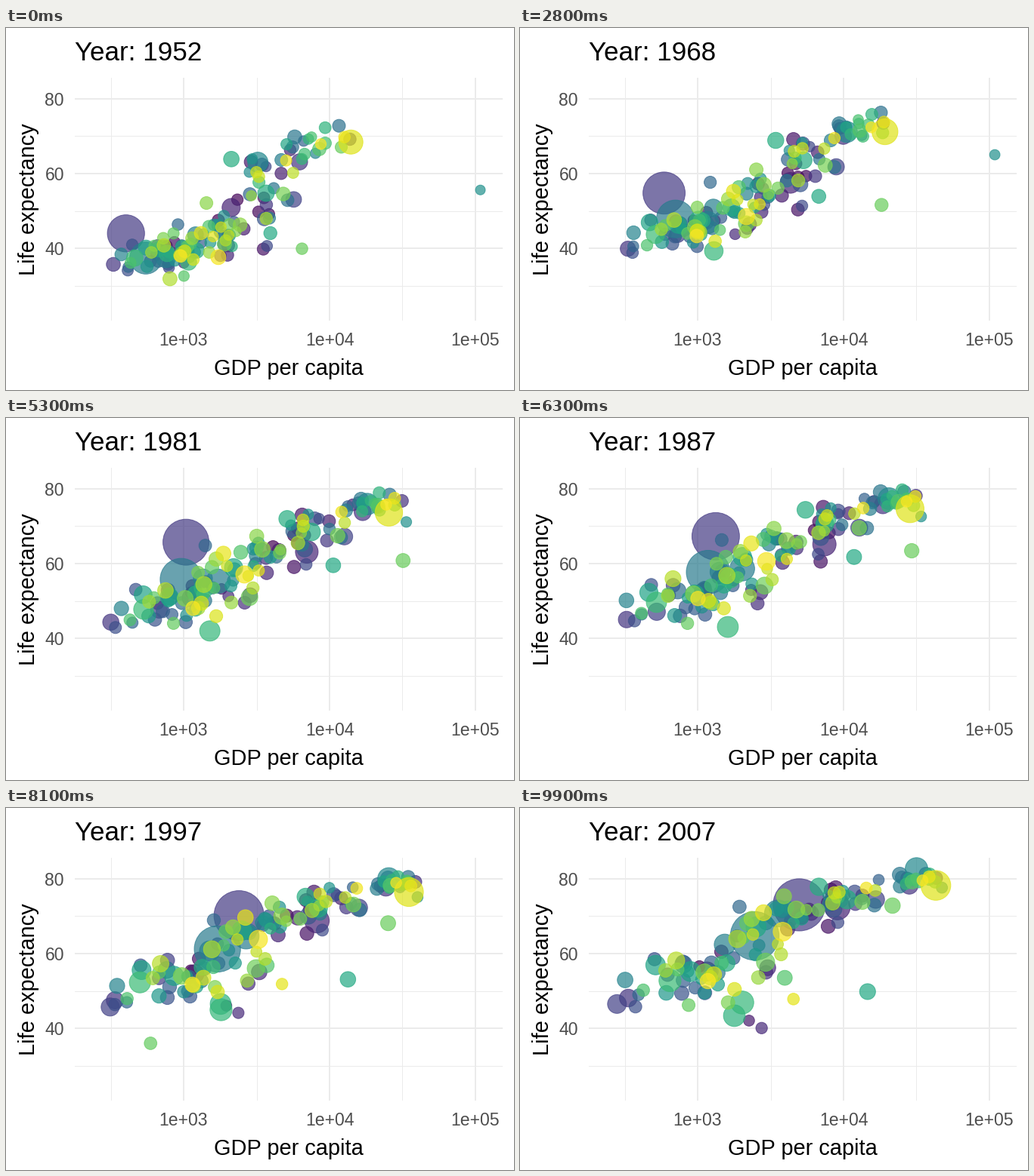
A matplotlib script that plays this animation: 672 by 480 pixels, repeating every 10 s.

```python
import matplotlib.pyplot as plt
import numpy as np
from matplotlib.animation import FuncAnimation

W, H, DPI = 672, 480, 96
FRAMES, COUNT, STEP = 100, 142, 9    # a survey every STEP frames
YEARS = np.arange(0, 56, 5)          # years after 1952
P = YEARS / 55
EASE = 1 - (1 - P) ** 1.5            # early gains are the fastest
FALL = np.clip((YEARS - 35) / 15, 0, 1)

rng = np.random.default_rng(11)
gdp, life, pop = np.zeros((3, len(YEARS), COUNT))   # log10, years, millions


def bubble(i, people, *points):
    """One bubble led through a few (year, wealth, age) points."""
    t, wealth, age = zip(*points)
    gdp[:, i] = np.interp(YEARS, t, np.log10(wealth))
    life[:, i] = np.interp(YEARS, t, age)
    pop[:, i] = np.interp(YEARS, (0, 55), people)


def track(ends, spreads, z, ease):
    start, end = np.array(ends) + np.array(spreads) * z
    return start + (end - start) * ease


def crowd(slots, wealth, wealth_sd, age, age_sd, growth, fall=0):
    """Seeded bubbles that drift from a start cloud to an end cloud."""
    for i in slots:
        zw, za, zp = np.clip(rng.normal(size=3), -2, 2)
        za = .5 * zw + .85 * za
        wobble = rng.normal(size=(2, len(YEARS)))
        gdp[:, i] = track(wealth, wealth_sd, zw, EASE) + .03 * wobble[0]
        life[:, i] = track(age, age_sd, za, EASE) + .5 * wobble[1]
        life[:, i] -= fall * FALL
        pop[:, i] = np.exp(1.6 + zp) * (1 + (growth - 1) * P)


bubble(24, (556, 1319), (0, 400, 44), (10, 488, 44.5), (20, 677, 63),
       (40, 1656, 68.7), (55, 4959, 73))
bubble(58, (372, 1110), (0, 547, 37.4), (25, 813, 54.2), (55, 2452, 64.7))
bubble(134, (158, 301), (0, 13990, 68.4), (55, 42952, 78.2))
bubble(59, (82, 224), (0, 750, 37.5), (55, 3541, 70.7))
bubble(66, (86, 127), (0, 3217, 63), (20, 14779, 73.4), (55, 31656, 82.6))
bubble(14, (57, 190), (0, 2109, 50.9), (25, 6660, 61.5), (55, 9066, 72.4))
bubble(94, (33, 135), (0, 1077, 36.3), (55, 2014, 46.9))
bubble(71, (.2, 2.5), (0, 108382, 55.6), (20, 109348, 67.7),
       (30, 31354, 71.3), (55, 47307, 77.6))
bubble(109, (4, 28), (0, 6460, 39.9), (25, 34168, 58.7), (55, 21655, 72.8))
bubble(107, (3, 9), (35, 848, 44), (40, 737, 23.6), (45, 590, 36),
       (55, 863, 46.2))
bubble(27, (14, 65), (0, 781, 39.1), (30, 674, 47.8), (50, 241, 45),
       (55, 278, 46.5))

free = rng.permutation(np.flatnonzero(pop[0] == 0))
poor, middle, upper, rich, falling = np.split(free, (48, 81, 105, 124))
crowd(poor, (2.93, 3.03), (.2, .27), (38.5, 54), (3, 5), 3.2)
crowd(middle, (3.3, 3.65), (.2, .22), (45, 71), (5, 3), 2.8)
crowd(upper, (3.55, 4.05), (.17, .15), (58, 75.5), (5, 1.7), 1.7)
crowd(rich, (3.88, 4.5), (.14, .07), (67.5, 79.8), (2.2, .8), 1.4)
crowd(falling, (3.1, 3.55), (.3, .38), (42, 64), (3, 4), 3, fall=18)

diameter = 12.3 + 56.9 * np.sqrt(np.clip(pop / 1318.7, 0, 1))   # pixels

plt.rcParams["font.family"] = ["Liberation Sans", "DejaVu Sans"]
fig = plt.figure(figsize=(W / DPI, H / DPI), dpi=DPI, facecolor="white")
ax = fig.add_axes((91 / W, 1 - 388 / H, 566 / W, 322 / H))
ax.set(xlim=(2.2507, 5.1879), ylim=(20.68, 85.58))
ax.axis("off")


def grid(xs, ys, width):
    for x in xs:
        ax.axvline(x, color="#EBEBEB", lw=width, zorder=0)
    for y in ys:
        ax.axhline(y, color="#EBEBEB", lw=width, zorder=0)


grid((2.5, 3.5, 4.5), (30, 50, 70), .75)
grid((3, 4, 5), (40, 60, 80), 1.5)


def label(x, y, text, px, **kw):
    return fig.text(x / W, 1 - y / H, text, fontsize=px * 72 / DPI,
                    va="baseline", **kw)


title = label(91, 43, "", 35, ha="left")
label(373.5, 460, "GDP per capita", 29, ha="center")
label(38, 227, "Life expectancy", 29, ha="center", rotation=90,
      rotation_mode="anchor")
for k in range(3):
    label(235 + 193 * k, 421, f"1e+0{3 + k}", 23, ha="center",
          color="#4D4D4D")
    label(77, 103 + 99 * k, str(80 - 20 * k), 23, ha="right",
          color="#4D4D4D")

colors = plt.get_cmap("viridis")(np.linspace(0, 1, COUNT))
colors[:, 3] = .7
dots = ax.scatter(gdp[0], life[0], s=1, c=colors, edgecolors=colors,
                  linewidths=.75, zorder=2, clip_on=False)


def draw(n):
    k, part = divmod(n, STEP)
    after = min(k + 1, len(YEARS) - 1)
    x, y, d = (v[k] + (v[after] - v[k]) * part / STEP
               for v in (gdp, life, diameter))
    dots.set_offsets(np.column_stack((x, y)))
    dots.set_sizes((d * 72 / DPI) ** 2)
    title.set_text(f"Year: {round(1952 + 55 * n / (FRAMES - 1))}")
    return dots, title


anim = FuncAnimation(fig, draw, frames=FRAMES, interval=100, repeat=True,
                     repeat_delay=0)
plt.show()
```
